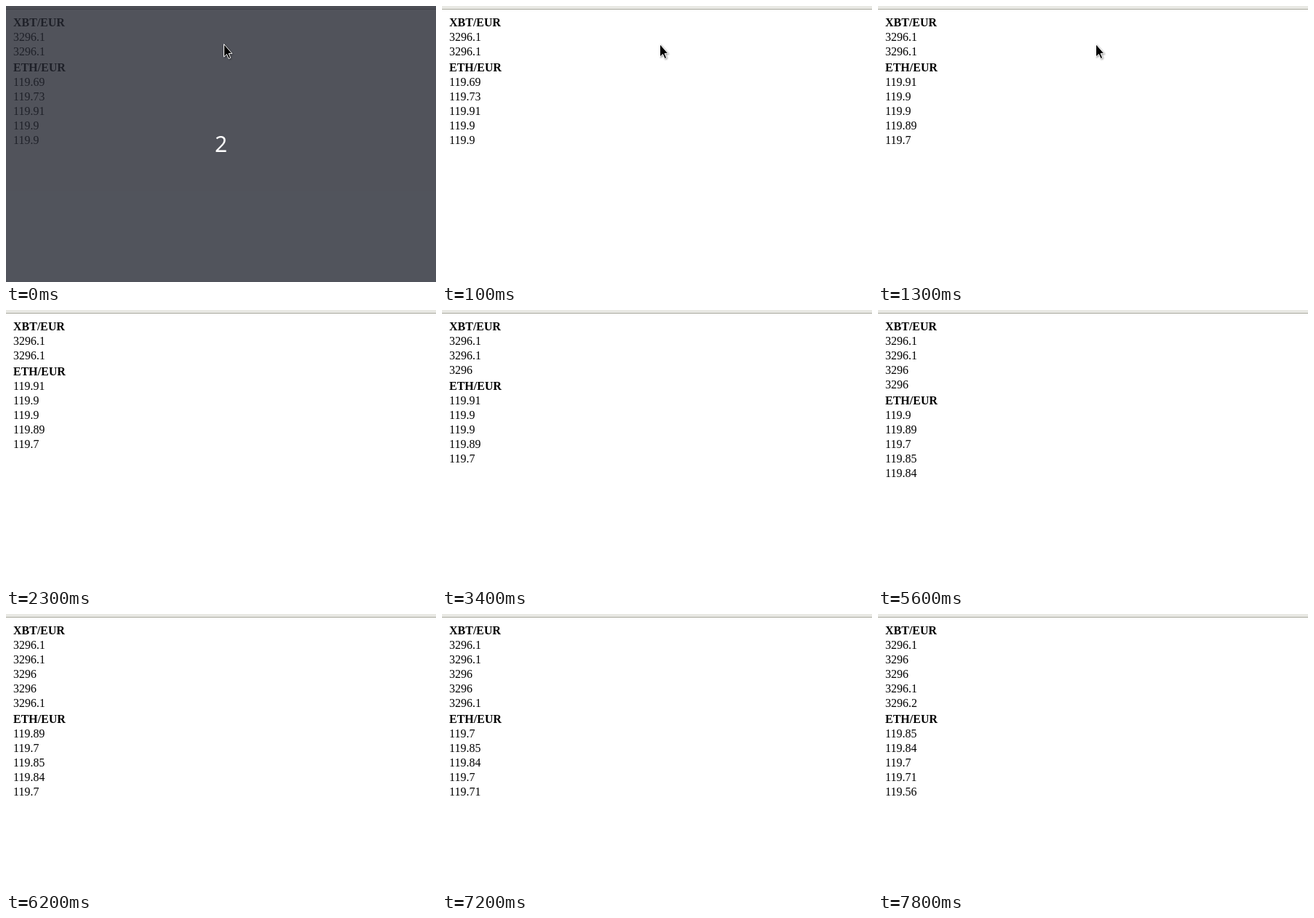
An HTML page for the animation above (8000 ms loop, 593 px wide and 380 px high).

```html
<!DOCTYPE html>
<html lang="en">
<head>
<meta charset="utf-8">
<title>Price ticker</title>
<style>
  html, body { margin: 0; width: 100%; height: 100%; overflow: hidden; background: #fff; }
  svg { display: block; width: 593px; height: 380px; }
  text { font: 16px "Liberation Serif", serif; white-space: pre; }
  .head { font-weight: bold; }
  #count { font: 30px "Noto Sans", "Open Sans", sans-serif; fill: #fff; text-anchor: middle; }
  #cursor { filter: drop-shadow(1px 1px 1px rgba(0, 0, 0, .4)); }
</style>
</head>
<body>
<svg viewBox="0 0 593 380">
  <rect width="593" height="380" fill="#fff"/>
  <rect width="593" height="4" fill="#e8e8e3"/>
  <rect y="4" width="593" height="1" fill="#a9a99f"/>
  <g id="prices"></g>
  <g id="shade">
    <rect width="593" height="380" fill="#262933" fill-opacity=".8"/>
    <text id="count" x="296.5" y="201">2</text>
  </g>
  <path id="cursor" d="M300.5 52.5V70l4-3.6 2.6 6.1 2.6-1.1-2.6-6h4.7z" fill="#000" stroke="#fff"/>
</svg>
<script>
const LOOP = 8000, LEFT = 10, ROW = 20, VISIBLE = 5;
const xbt = [3296.1, 3296.1, 3296, 3296, 3296.1, 3296.2];
const eth = [119.69, 119.73, 119.91, 119.9, 119.9, 119.89,
             119.7, 119.85, 119.84, 119.7, 119.71, 119.56];

// Times at which each list receives one more price
const xbtTicks = [3400, 5100, 6200, 7800];
const ethTicks = [1300, 1300, 4300, 5600, 6000, 7200, 7400];

const byId = id => document.getElementById(id);
const prices = byId('prices'), shade = byId('shade'), cursor = byId('cursor');

const received = (start, ticks, t) => start + ticks.filter(tick => tick <= t).length;
const latest = (list, count) => list.slice(Math.max(0, count - VISIBLE), count);
const line = (content, y, name = '') => `<text class="${name}" x="${LEFT}" y="${y}">${content}</text>`;

function section(title, values, y) {
  return line(title, y, 'head') + values.map((v, i) => line(v, y + ROW * (i + 1))).join('');
}

let shown = '';
function drawPrices(t) {
  const top = latest(xbt, received(2, xbtTicks, t));
  const bottom = latest(eth, received(5, ethTicks, t));
  const markup = section('XBT/EUR', top, 28) +
                 section('ETH/EUR', bottom, 50 + ROW * top.length);
  if (markup !== shown) prices.innerHTML = shown = markup;
}

function drawCursor(t) {
  const step = t < 2100 ? 0 : t < 2200 ? .5 : 1;
  cursor.setAttribute('transform', `translate(${-258 * step} ${-47 * step})`);
  cursor.style.display = t < 2300 ? '' : 'none';
}

const start = performance.now();
function frame() {
  const t = (performance.now() - start) % LOOP;
  drawPrices(t);
  drawCursor(t);
  shade.style.display = t < 100 ? '' : 'none';
  requestAnimationFrame(frame);
}
frame();
</script>
</body>
</html>
```
